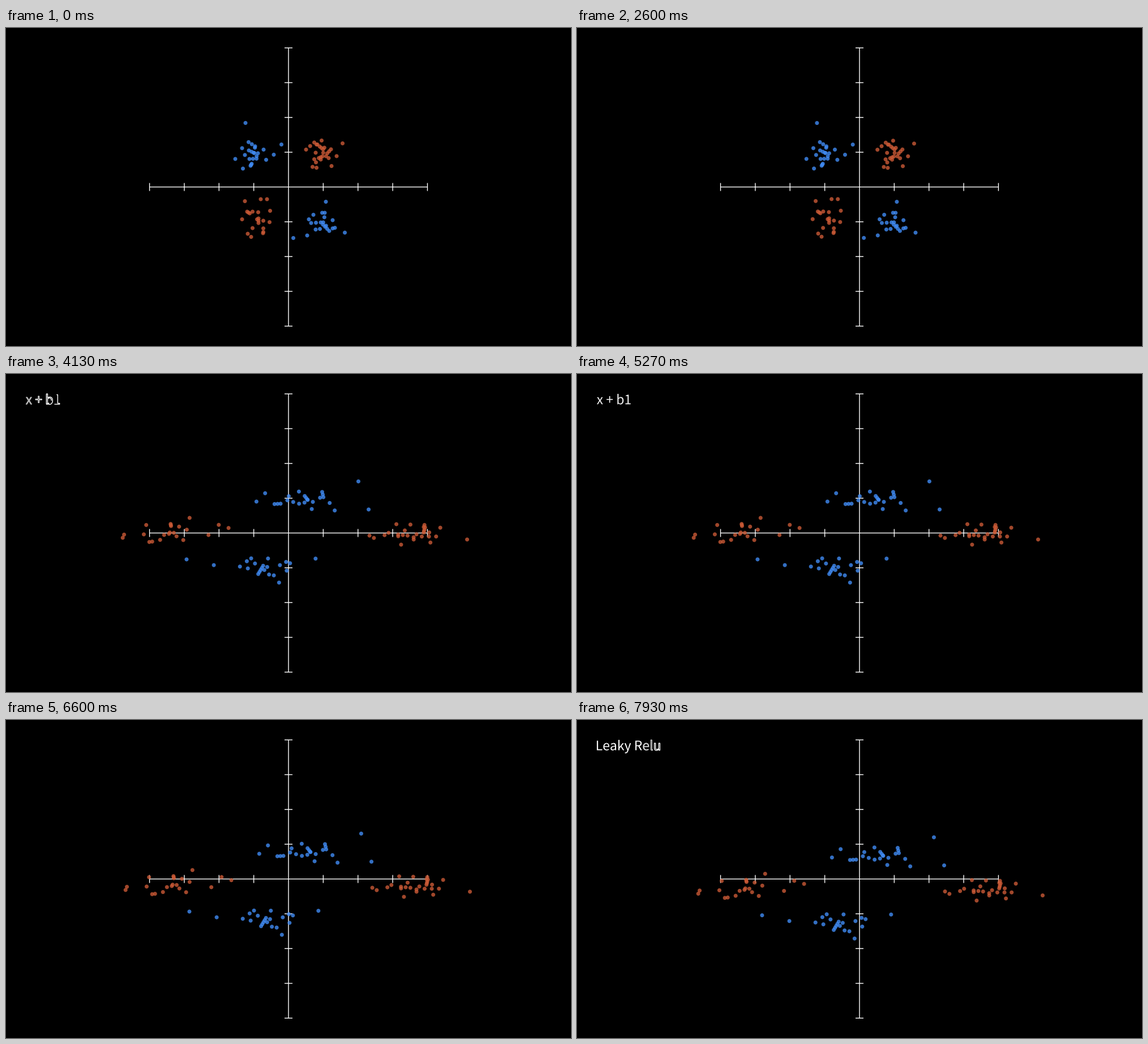
A matplotlib script for the animation above (8000 ms loop, 998 by 561 pixels).

```python
import numpy as np
import matplotlib.pyplot as plt
from matplotlib.animation import FuncAnimation
from matplotlib.collections import LineCollection
from matplotlib.patches import PathPatch
from matplotlib.path import Path
from matplotlib.textpath import TextPath

W, H, DPI = 998, 561, 100
FPS, FRAMES = 15, 120
CX, CY = W / 2, H / 2
UNIT = H / 8                     # scene unit in pixels
STEP = 7 * UNIT / 8              # distance between ticks
THIN = 0.02 * UNIT * 72 / DPI    # line width in points
BLUE, RED = "#418cf5", "#cb5a36"

# Linear layer (y up), then its bias in pixels (y down)
WEIGHT = np.array([[1.571, 2.149], [-0.499, 0.470]])
BIAS = np.array([8.0, 17.5])

CORE = [(2, -8), (5, 7), (0, 1)]


def chain(x0, y0, x1, y1, n=3):
    return list(zip(np.linspace(x0, x1, n), np.linspace(y0, y1, n)))


def core(sx, sy):
    return [(CX + sx * STEP + dx, CY + sy * STEP + dy) for dx, dy in CORE]


top_right = [
    (548.5, 205.5), (550, 205.5), (557.5, 198.5), (547, 220), (594.5, 203.5),
    (584, 226), (570, 229.5), (556, 232), (544.5, 231.5), (547.5, 237),
    (541.5, 245), (548.5, 246.5), (575, 243.5),
] + (chain(530, 214.5, 544.5, 202) + chain(554, 209, 560, 214)
     + chain(574, 214, 567.5, 221) + chain(559, 226.5, 552.5, 229.5) + core(1, -1))

bottom_left = [
    (422, 305.5), (450, 302), (461, 302), (466.5, 322.5), (435.5, 324),
    (445.5, 325), (417, 337.5), (435.5, 353), (454.5, 353.5), (454.5, 360),
    (454, 362), (427, 363), (433, 368.5),
] + (chain(426, 324, 430.5, 327) + chain(446, 336, 446, 344)
     + chain(465.5, 342.5, 443.5, 337.5))

top_left = [
    (423, 167.5), (417, 212), (445, 221), (422, 224), (405, 231),
    (459.5, 232.5), (473, 223.5), (486.5, 205.5), (455, 214.5), (418.5, 248),
] + (chain(428.5, 201.3, 440, 208.7) + chain(429, 216, 438.5, 220.5)
     + chain(430, 231, 442.5, 230.5) + chain(434, 239.5, 432, 243) + core(-1, -1))

bottom_right = [
    (565, 306.5), (543, 329.5), (558.5, 326), (563, 326), (535, 337.5),
    (577, 339), (577, 353.5), (581, 352.5), (547, 355.5), (554.5, 354.5),
    (532, 366), (598.5, 361), (507.5, 370.5),
] + (chain(539, 344, 556, 343) + chain(560, 347, 571, 358, 4) + core(1, 1))

reds = top_right + bottom_left
blues = top_left + bottom_right
start = np.array(reds + blues)
local = (start - (CX, CY)) * (1, -1)
mixed = (local @ WEIGHT.T) * (1, -1) + (CX, CY)
shifted = mixed + BIAS


def smooth(t):
    t = min(max(t, 0), 1)
    edge = 1 / (1 + np.exp(5))
    return (1 / (1 + np.exp(-10 * (t - 0.5))) - edge) / (1 - 2 * edge)


fig = plt.figure(figsize=(W / DPI, H / DPI), dpi=DPI, facecolor="black")
ax = fig.add_axes([0, 0, 1, 1])
ax.set_xlim(0, W)
ax.set_ylim(H, 0)
ax.axis("off")

reach, tick = 4 * STEP, 0.1 * UNIT
lines = [[(CX - reach, CY), (CX + reach, CY)], [(CX, CY - reach), (CX, CY + reach)]]
for k in (-4, -3, -2, -1, 1, 2, 3, 4):
    x, y = CX + k * STEP, CY + k * STEP
    lines.append([(x, CY - tick), (x, CY + tick)])
    lines.append([(CX - tick, y), (CX + tick, y)])
grid = LineCollection(lines, colors="white", linewidths=THIN, zorder=1)
grid.set_snap(False)
ax.add_collection(grid, autolim=False)

dots = ax.scatter(start[:, 0], start[:, 1], s=(0.1 * UNIT * 72 / DPI) ** 2,
                  c=[RED] * len(reds) + [BLUE] * len(blues),
                  alpha=0.8, linewidths=0, zorder=2)


def outline(polys):
    return Path.make_compound_path(*[Path(p) for p in polys])


class Title:
    """Label in the upper left that is drawn, held and faded out."""
    SIZE, FINE = 23, 10

    def __init__(self, text, begin):
        self.begin = begin
        make = lambda s: TextPath((0, 0), s, size=self.SIZE * self.FINE,
                                  prop={"family": "Noto Sans CJK JP"})
        full = make(text)
        glyphs, a = [], 0
        for i in range(1, len(text) + 1):
            b = len(make(text[:i]).vertices)
            if b > a:
                part = Path(full.vertices[a:b], full.codes[a:b])
                glyphs.append([p * (1, -1) / self.FINE
                               for p in part.to_polygons(closed_only=False)])
            a = b
        corner = np.vstack([p for g in glyphs for p in g]).min(axis=0)
        self.glyphs = [[p - corner + UNIT / 2 for p in g] for g in glyphs]
        self.patches = []
        for g in self.glyphs:
            patch = PathPatch(outline(g), visible=False, zorder=3)
            patch.set_snap(False)
            self.patches.append(ax.add_patch(patch))

    def draw(self, t):
        t -= self.begin
        fade = 1 - smooth(t - 1.5)
        lag = 0.2
        head = min(t, 1) * ((len(self.glyphs) - 1) * lag + 1)
        for i, (g, patch) in enumerate(zip(self.glyphs, self.patches)):
            p = min(max(head - i * lag, 0), 1)
            patch.set_visible(p > 0 and t < 2.5)
            if not patch.get_visible():
                continue
            fill = max(2 * p - 1, 0)
            patch.set_path(outline(self.portion(g, min(2 * p, 1))))
            patch.set_facecolor((1, 1, 1, fill * fade))
            patch.set_edgecolor((1, 1, 1, fade if fill < 1 else 0))
            patch.set_linewidth(THIN * (1 - fill))

    @staticmethod
    def portion(polys, share):
        left = max(2, round(share * sum(len(p) for p in polys)))
        kept = []
        for p in polys:
            if left < 2:
                break
            kept.append(p[:left])
            left -= len(p)
        return kept


titles = [Title("x @ w1", 0.05), Title("x + b1", 3.55), Title("Leaky Relu", 7.05)]


def update(n):
    t = n / FPS
    first, second = smooth(t - 2.55), smooth(t - 6.05)
    dots.set_offsets(start + (mixed - start) * first + (shifted - mixed) * second)
    for title in titles:
        title.draw(t)
    return [dots]


anim = FuncAnimation(fig, update, frames=FRAMES, interval=8000 / FRAMES,
                     init_func=lambda: update(0), repeat=True, repeat_delay=0)
plt.show()
```
